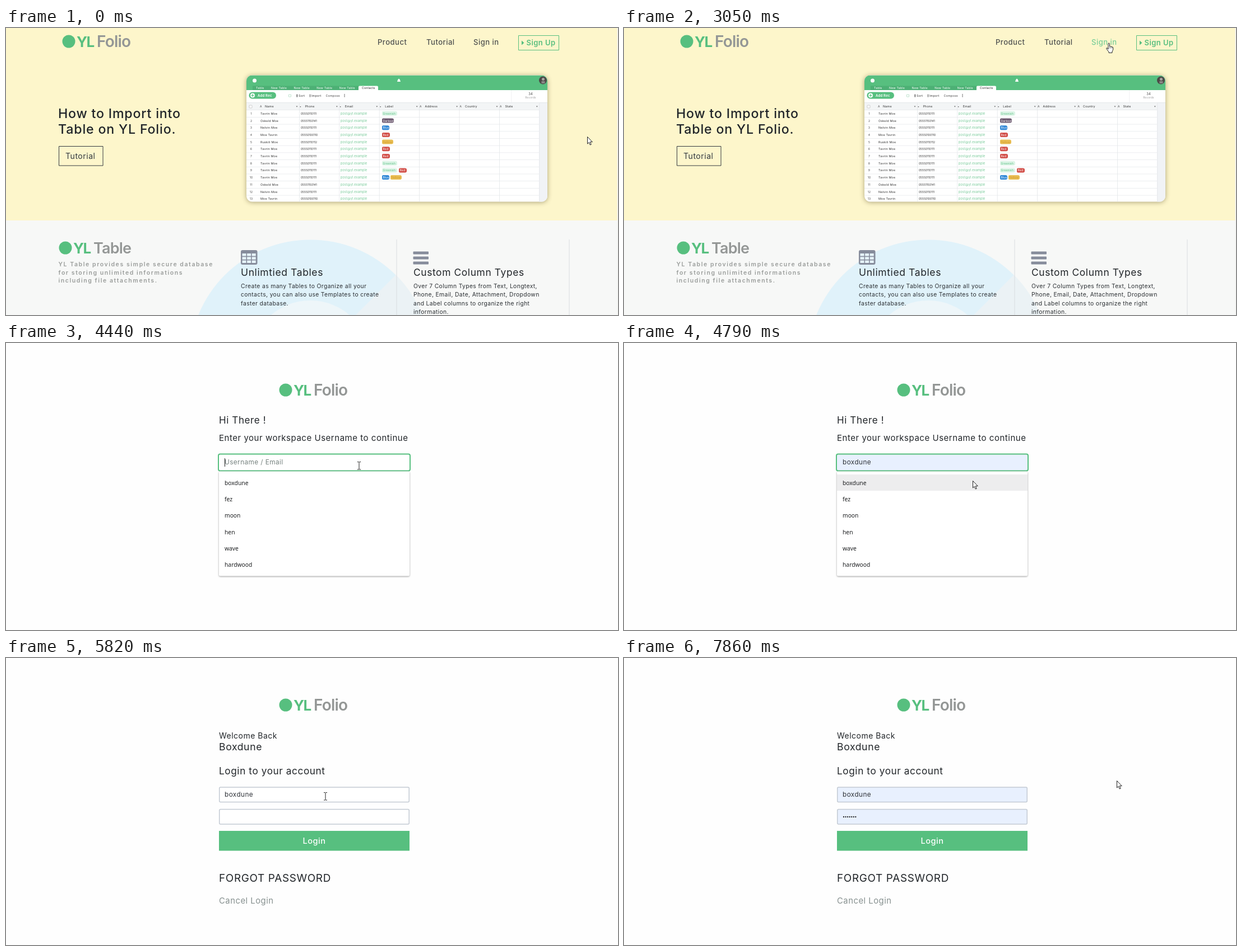
Recreate the animation shown at these times as an HTML page with a canvas. Size 1092 by 513 pixels, loop 8 s.

```html
<!DOCTYPE html>
<html lang="en">
<head>
<meta charset="utf-8">
<title>Sign in walkthrough</title>
<style>
html, body { margin: 0; width: 100%; height: 100%; overflow: hidden; background: #fefefe; }
canvas { display: block; width: 1092px; height: 513px; }
</style>
</head>
<body>
<canvas id="stage"></canvas>
<script>
const W = 1092, H = 513, LOOP = 8000, PI = 3.14159265;
const GREEN = '#57bf7f', LIGHT = '#79ce98', INK = '#212529', GREY = '#949796';
const SANS = 'Inter, "Open Sans", sans-serif';
const USER = 'boxdune';

const canvas = document.getElementById('stage');
const ctx = canvas.getContext('2d');
const dpr = window.devicePixelRatio || 1;
canvas.width = W * dpr;
canvas.height = H * dpr;

// start time, cursor kind, cursor position, screen
const steps = [
  [0, 'arrow', 1037, 194, 'home'],
  [650, 'arrow', 1037, 167, 'home'],
  [1000, 'arrow', 1033, 101, 'home'],
  [1350, 'arrow', 1030, 72, 'home'],
  [1680, 'arrow', 923, 44, 'home'],
  [2030, 'arrow', 869, 48, 'home'],
  [2730, 'hand', 862, 32, 'home'],
  [3050, 'hand', 860, 26, 'homeHover'],
  [3410, 'arrow', 864, 26, 'name'],
  [3770, 'arrow', 754, 139, 'name'],
  [4090, 'arrow', 628, 235, 'name'],
  [4440, 'beam', 630, 219, 'nameList'],
  [4790, 'arrow', 622, 246, 'namePick'],
  [5140, 'hand', 606, 246, 'nameFilled'],
  [5470, 'hand', 606, 246, 'nameSent'],
  [5820, 'beam', 570, 247, 'loginEmpty'],
  [6170, 'beam', 570, 247, 'login'],
  [6500, 'arrow', 565, 300, 'login'],
  [6850, 'arrow', 560, 311, 'loginSent'],
  [7550, 'arrow', 858, 221, 'login'],
  [7860, 'arrow', 879, 219, 'login']
];

function text(str, x, y, size, color = INK, opt = {}) {
  const { weight = 400, gap = 0.035 * size, align = 'left', family = SANS } = opt;
  ctx.font = `${weight} ${size}px ${family}`;
  ctx.letterSpacing = gap + 'px';
  ctx.textAlign = align;
  ctx.fillStyle = color;
  ctx.fillText(str, x, y);
}

function rect(x, y, w, h, color) {
  ctx.fillStyle = color;
  ctx.fillRect(x, y, w, h);
}

function box(x, y, w, h, r, fill, stroke, line = 1) {
  ctx.beginPath();
  ctx.roundRect(x, y, w, h, r);
  if (fill) { ctx.fillStyle = fill; ctx.fill(); }
  if (stroke) { ctx.strokeStyle = stroke; ctx.lineWidth = line; ctx.stroke(); }
}

function disc(x, y, r, color) {
  ctx.beginPath();
  ctx.arc(x, y, r, 0, PI * 2);
  ctx.fillStyle = color;
  ctx.fill();
}

function poly(points, fill, stroke) {
  ctx.beginPath();
  points.forEach(([x, y]) => ctx.lineTo(x, y));
  ctx.closePath();
  ctx.fillStyle = fill;
  ctx.fill();
  if (stroke) { ctx.strokeStyle = stroke; ctx.lineWidth = 1; ctx.stroke(); }
}

const play = (x, y, w, h, color) => poly([[x, y - h], [x + w, y], [x, y + h]], color);

function logo(x, base, word, size) {
  disc(x + 12, base - 10, 11.5, GREEN);
  text('YL', x + 26, base, 26, GREEN, { weight: 700, gap: -1.5 });
  text(word, x + 62, base, size, GREY, { weight: 600, gap: -0.03 * size });
}

function pills(y, list) {
  list.forEach(([x, w, color, label, ink]) => {
    box(x, y - 4, w, 8, [2, 3, 3, 2], color);
    text(label, x + 1.5, y + 2, 5, ink);
  });
}

function preview() {
  const L = 429, T = 84.5, PW = 537, PH = 226;
  ctx.save();
  ctx.shadowColor = 'rgba(70,60,20,.45)';
  ctx.shadowBlur = 9 * dpr;
  ctx.shadowOffsetY = dpr;
  box(L, T, PW, PH, 10, '#fff');
  ctx.restore();
  ctx.save();
  ctx.beginPath();
  ctx.roundRect(L, T, PW, PH, 10);
  ctx.clip();

  rect(L, T, PW, 26.5, GREEN);
  disc(443.5, 94, 3.5, '#fff');
  poly([[698, 96], [699.3, 92], [701, 90.5], [702.7, 92], [704, 96]], '#fff');
  disc(958, 93.5, 7, '#4c4a48');
  disc(958.5, 91.5, 2.5, '#a9a6a2');
  rect(955.5, 95, 6, 4, '#8a8886');

  rect(440, 103.5, 189, 7.5, '#4db075');
  ['Table', 'New Table', 'New Table', 'New Table', 'New Table'].forEach((s, i) =>
    text(s, i ? 473 + (i - 1) * 40.6 : 446, 109.3, 5.3, '#fff'));
  box(629, 103.5, 35, 8, [2, 2, 0, 0], '#fff');
  text('Contacts', 635, 109.3, 5.2, '#222');

  box(433.5, 114.5, 48.5, 12, 6, GREEN);
  disc(440, 120.5, 4, '#fff');
  rect(437.5, 119.9, 5, 1.2, GREEN);
  rect(439.4, 118, 1.2, 5, GREEN);
  text('Add Rec', 449, 123, 6, '#fff', { weight: 600 });
  box(504.5, 119, 4, 4, 0, null, '#a8d9bc', 0.7);
  rect(518.7, 118.5, 1.2, 5, '#333');
  text('Sort', 522, 123, 5.3, '#333');
  rect(542, 118.5, 0.9, 5, '#333');
  text('Import', 545, 123, 5.3, '#333');
  text('Compose', 570.5, 123, 5.3, '#444');
  for (let i = 0; i < 3; i++) disc(604, 118.7 + i * 2, 0.7, '#444');
  rect(901.5, 111, 0.7, 22, '#e9ecee');
  text('34', 936, 120, 5.8, '#444', { align: 'center' });
  text('Records', 936, 126, 4.6, '#999', { align: 'center' });

  rect(L, 133.5, PW, 13, '#f3f5f6');
  rect(951, 133.5, 15, 178, '#f1f3f6');
  rect(L, 133, PW, 0.8, '#dfe3e6');
  box(434, 138, 5, 5, 1, '#fff', '#bbb', 0.7);
  ['Name', 'Phone', 'Email', 'Label', 'Address', 'Country', 'State'].forEach((s, i) => {
    const x = 452 + i * 71.4;
    text(i > 0 && i < 4 ? '▪' : 'A', x + (i ? 0.5 : 1), 142, 5, '#555');
    text(s, x + 10, 142, 5.4, '#333');
    poly([[x + 65.5, 139.5], [x + 68.5, 139.5], [x + 67, 141.5]], '#666');
  });
  for (let i = 0; i < 7; i++) rect(523 + i * 71.4, 133.5, 0.8, 178, '#e3e6e9');

  const people = ['Tavrin Moe', 'Oskeld Moe', 'Nelvin Moe', 'Moe Tavrin', 'Ruskili Moe'];
  const phones = ['05550110111', '05551150141', '05550110111', '05550100110', '05550110112'];
  const who = [0, 1, 2, 3, 4, 0, 0, 0, 0, 0, 1, 2, 3];
  const mint = [671, 27, '#dcf4e6', 'Greenish', '#5cbf84'];
  const dark = [671, 21, '#6d5a70', 'Darkest', '#fff'];
  const blue = [671, 13, '#2f87d6', 'Blue', '#fff'];
  const red = [671, 14, '#d2504a', 'Red', '#fff'];
  const gold = [671, 20, '#e8bd53', 'Yellow', '#d19b2a'];
  const at = (p, x) => [x, ...p.slice(1)];
  const tags = [[mint], [dark], [blue], [red], [gold], [red], [red], [mint],
    [mint, at(red, 701)], [blue, at(gold, 686)]];
  who.forEach((p, i) => {
    const y = 152.8 + i * 12.7;
    rect(L, y - 6.5, 522, 0.7, '#e3e6e9');
    text(String(i + 1), 437.5, y + 2, 5, '#444', { align: 'center' });
    text(people[p], 454, y + 2, 5.4, '#333');
    text(phones[p], 526, y + 2, 4.9, '#333', { gap: 0 });
    text('post@yl.example', 597, y + 2, 5.5, '#72c795');
    if (tags[i]) pills(y, tags[i]);
  });
  ctx.restore();
}

function home(hover) {
  rect(0, 0, W, 344, '#fdf6cb');
  rect(0, 344, W, H - 344, '#f7f8f7');

  logo(100, 34, 'Folio', 28);
  const nav = { weight: 500 };
  text('Product', 663, 29.5, 13.1, '#4f5150', nav);
  text('Tutorial', 750, 29.5, 13.1, '#4f5150', nav);
  text('Sign in', 834, 29.5, 13.1, hover ? LIGHT : '#4f5150', nav);
  box(914.5, 13.5, 72, 26, 0, null, GREEN);
  play(920, 26.5, 4.5, 4, GREEN);
  text('Sign Up', 928.5, 31, 13, GREEN, { weight: 600 });

  text('How to Import into', 93, 161, 23.2, INK, { weight: 500 });
  text('Table on YL Folio.', 93, 188.5, 23.2, INK, { weight: 500 });
  box(94.5, 211.5, 78.5, 34.5, 0, null, '#343a40');
  text('Tutorial', 106, 233.5, 14.1, '#343a40');
  preview();

  // pie chart backdrop
  const cx = 543, cy = 594, r = 215.6;
  disc(cx, cy, r, '#e0f2fa');
  ctx.beginPath();
  ctx.moveTo(cx, cy);
  ctx.arc(cx, cy, r, -PI / 4, 0);
  ctx.fillStyle = '#ebf2f5';
  ctx.fill();
  disc(cx, cy, 107, '#eef6f9');
  rect(696.5, 378, 1, 135, '#d9dcdf');
  rect(1004.5, 378, 1, 135, '#d9dcdf');

  logo(94, 403, 'Table', 27);
  ['YL Table provides simple secure database',
   'for storing unlimited informations',
   'including file attachments.'].forEach((s, i) =>
    text(s, 93.5, 426 + i * 14.6, 10.5, '#9a9d9b', { weight: 600, gap: 1.57 }));

  const icon = '#868c9b';
  box(419, 397, 29.5, 26, 3, icon);
  for (let i = 0; i < 9; i++)
    rect(421.5 + i % 3 * 8.6, 403 + (i / 3 | 0) * 6.2, 7, 4.6, '#e6f4fa');
  for (let i = 0; i < 3; i++) box(726.5, 399.5 + i * 9, 27.5, 5, 1, icon);

  text('Unlimtied Tables', 419, 443, 17.5);
  text('Custom Column Types', 727, 443, 17.4);
  const para = (x, lines) => lines.forEach((s, i) => text(s, x, 465 + i * 15.3, 10.35, '#2c3034'));
  para(419, ['Create as many Tables to Organize all your',
    'contacts, you can also use Templates to create', 'faster database.']);
  para(727, ['Over 7 Column Types from Text, Longtext,',
    'Phone, Email, Date, Attachment, Dropdown',
    'and Label columns to organize the right', 'information.']);
  rect(1090.5, 0, 1.5, H, '#f4f4f2');
}

function field(y, str, { filled, focus, hint } = {}) {
  const bg = filled ? '#e8f0fe' : '#fff';
  if (focus) box(379, y - 1.5, 342, 30, 3, bg, GREEN, 2);
  else box(380.75, y, 338.5, 26.5, 2, bg, '#c3cad3', 1.5);
  text(str, 390, y + 17, 11.8, hint ? '#76827f' : '#30343a');
}

function button(y, h, label, sent, size = 14.7) {
  rect(380, y, 340, h, sent ? LIGHT : GREEN);
  text(label, 550, y + h / 2 + 5, size, '#fff', { align: 'center', weight: 500 });
}

function dropdown(picked) {
  ctx.save();
  ctx.shadowColor = 'rgba(0,0,0,.4)';
  ctx.shadowBlur = 3 * dpr;
  ctx.shadowOffsetY = dpr;
  box(380, 229.5, 340, 187, 2, '#fff');
  ctx.restore();
  if (picked) rect(380, 235, 340, 29, '#ededee');
  [USER, 'fez', 'moon', 'hen', 'wave', 'hardwood'].forEach((s, i) =>
    text(s, 390, 254 + i * 29.2, 10.3, '#1d1f21',
      { weight: 500, gap: 0, family: '"Noto Sans", "Open Sans", sans-serif' }));
}

function askName(state) {
  const list = state === 'nameList', pick = state === 'namePick';
  const done = state === 'nameFilled', sent = state === 'nameSent';
  const filled = pick || done || sent;
  text('Hi There !', 380, 144, 17);
  text('Enter your workspace Username to continue', 380, 175, 15);
  field(200, filled ? USER : 'Username / Email', { filled, focus: list || pick || done, hint: !filled });
  if (list) rect(390, 206, 1, 15, '#222');
  if (list || pick) return dropdown(pick);
  if (sent) rect(379, 238, 342, 37, '#a9dfbe');
  button(239, 35, '', sent);
  text('Continue', 514, 261, 14.6, '#fff', { weight: 500 });
  play(702, 256, 6, 5, '#fff');
  text('FORGOT USERNAME', 380, 330, 18.9);
}

function login(state) {
  const filled = state !== 'loginEmpty', sent = state === 'loginSent';
  text('Welcome Back', 380, 144, 14);
  text('Boxdune', 380, 164.5, 17.6);
  text('Login to your account', 380, 208, 17.2);
  field(231, USER, { filled });
  field(270.5, '', { filled });
  if (filled) for (let i = 0; i < 7; i++) disc(392 + i * 3.55, 284, 1.15, '#222');
  button(309, 35.5, sent ? 'Login in...' : 'Login', sent, sent ? 14 : 14.6);
  text('FORGOT PASSWORD', 380, 400, 18.9);
  text('Cancel Login', 380, 438.5, 14.8, '#86908f');
}

const cursors = {
  arrow() {
    poly([[0.5, 0.5], [0.5, 13], [3.3, 10.4], [5.2, 15], [7.2, 14.2], [5.3, 9.7], [9.3, 9.7]],
      '#fff', '#222');
  },
  hand() {
    ctx.beginPath();
    ctx.moveTo(4, 12);
    ctx.lineTo(4, 2);
    ctx.quadraticCurveTo(5.2, -0.5, 6.4, 2);
    ctx.lineTo(6.4, 7);
    ctx.quadraticCurveTo(8, 5.8, 8.8, 7.4);
    ctx.quadraticCurveTo(10.4, 6.4, 11, 8.2);
    ctx.quadraticCurveTo(12.8, 7.6, 12.8, 9.6);
    ctx.quadraticCurveTo(13, 14, 11, 16);
    ctx.lineTo(11, 18.3);
    ctx.lineTo(5, 18.3);
    ctx.lineTo(5, 16.5);
    ctx.lineTo(1, 11.5);
    ctx.quadraticCurveTo(0.2, 9, 2.4, 9.8);
    ctx.closePath();
    ctx.fillStyle = '#fff';
    ctx.fill();
    ctx.strokeStyle = '#222';
    ctx.lineWidth = 1;
    ctx.stroke();
    for (const x of [6.4, 8.7, 10.9]) rect(x - 0.3, 7.5, 0.7, 3, '#444');
  },
  beam() {
    rect(-0.5, -6, 1, 13, '#222');
    for (const y of [-7, 6.5]) {
      rect(-3, y, 2.5, 1, '#222');
      rect(0.5, y, 2.5, 1, '#222');
    }
  }
};

function draw(t) {
  const [, kind, x, y, screen] = steps.findLast(s => s[0] <= t);
  ctx.setTransform(dpr, 0, 0, dpr, 0, 0);
  rect(0, 0, W, H, '#fefefe');
  if (screen.startsWith('home')) home(screen === 'homeHover');
  else {
    logo(487, 94, 'Folio', 28);
    if (screen.startsWith('name')) askName(screen);
    else login(screen);
  }
  ctx.translate(x, y);
  cursors[kind]();
}

const start = performance.now();
function tick() {
  draw((performance.now() - start) % LOOP);
  requestAnimationFrame(tick);
}
tick();
</script>
</body>
</html>
```
